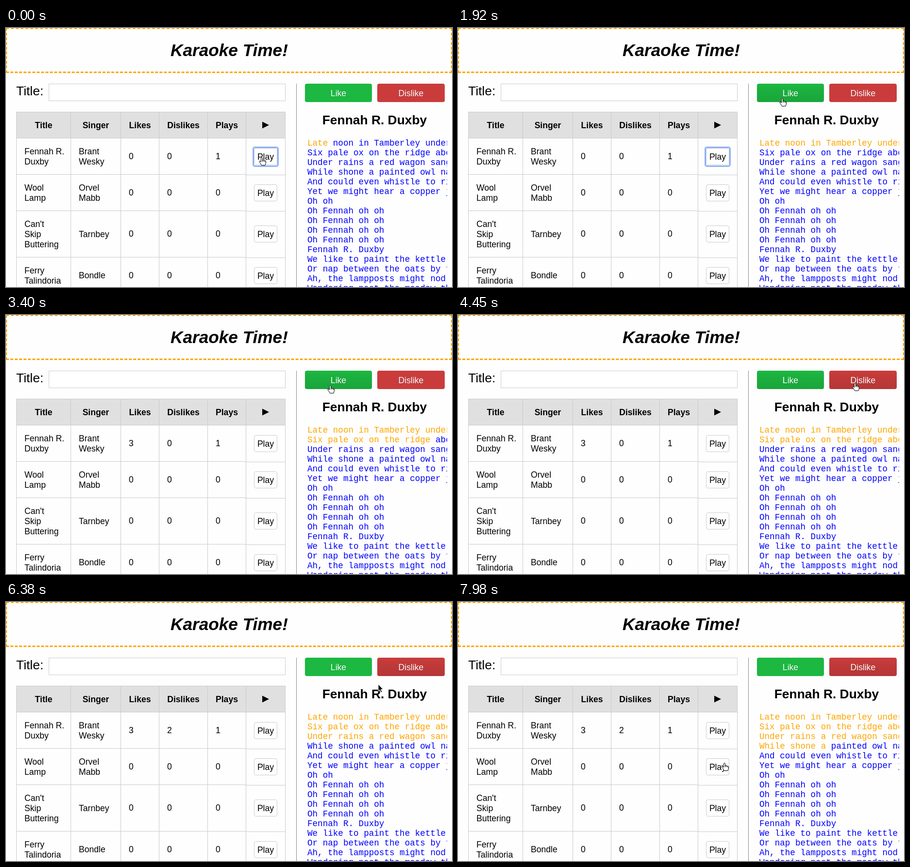
Recreate the animation shown at these times as an HTML page. Size 919 px wide and 535 px high, loop 8000 ms.

```html
<!DOCTYPE html>
<html lang="en">
<head>
<meta charset="utf-8">
<title>Karaoke Time!</title>
<style>
  html, body { margin: 0; width: 100%; height: 100%; overflow: hidden; background: #fefefe; }
  header {
    position: absolute; left: 0; top: 0; width: 919px; height: 93px; box-sizing: border-box;
    border: dashed orange; border-width: 2px 2px 3px;
  }
  svg { position: absolute; left: 0; top: 0; }
  text { font: 17.6px "Liberation Sans", Arial, sans-serif; white-space: pre; }
  .bold { font-weight: bold; }
  .big { font-size: 26.4px; }
  .mid { text-anchor: middle; }
  .logo { font: italic bold 35.2px "Liberation Sans", Arial, sans-serif; }
  .white { fill: #fff; text-shadow: 0 1px 1px rgba(0,0,0,.2); }
  .lyric { font-family: "Liberation Mono", "Courier New", monospace; fill: #00f; }
  .sung { fill: orange; }
</style>
</head>
<body>
<header></header>
<svg id="stage" width="919" height="535"></svg>
<script>
const TICK = 147.7, LOOP = 8000;
const song = ["Fennah R.", "Duxby"];
const rows = [
  { top: 227, mid: 265, title: song, singer: ["Brant", "Wesky"] },
  { top: 302, mid: 340, title: ["Wool", "Lamp"], singer: ["Orvel", "Mabb"] },
  { top: 377, mid: 425.5, title: ["Can't", "Skip", "Buttering"], singer: ["Tarnbey"] },
  { top: 473, mid: 511, title: ["Ferry", "Talindoria"], singer: ["Bondle"] }
];
const lyrics = [
  "Late noon in Tamberley under an old skyline",
  "Six pale ox on the ridge above the waterwheel",
  "Under rains a red wagon sang of dusty old days",
  "While shone a painted owl named after rain",
  "And could even whistle to rivers",
  "Yet we might hear a copper jug",
  "Oh oh",
  ...Array(4).fill("Oh Fennah oh oh"),
  song.join(" "),
  "We like to paint the kettle in blue",
  "Or nap between the oats by the gate",
  "Ah, the lampposts might nod him by",
  "Wandering past the meadow that hums"
];
// Cursor hotspot: tick, x, y
const path = [
  [0, 527, 267], [6, 527, 267], [13, 668, 145], [24, 668, 145], [27, 735, 264],
  [30, 818, 140], [41, 818, 140], [43, 767, 170], [45, 670, 235], [46, 705, 286],
  [48, 820, 230], [49, 820, 230], [54, 549, 332]
];

const text = (x, y, s, cls = "", id = "") => `<text x="${x}" y="${y}" class="${cls}" id="${id}">${s}</text>`;
const rect = (x, y, w, h, more) => `<rect x="${x}" y="${y}" width="${w}" height="${h}" ${more}/>`;
const lines = (x, mid, list) => list.map((s, i) => text(x, mid + 6.5 + (i - (list.length - 1) / 2) * 21, s)).join("");

function voteButton(id, x, w, color, label) {
  return rect(x, 115, w, 38, `rx="4" fill="${color}"`) +
    rect(x, 115, w, 38, `rx="4" fill="url(#shade)" id="${id}Lit"`) +
    `<g id="${id}Down" fill="none" stroke="#000">` +
    rect(x + .5, 115.5, w - 1, 37, 'rx="4" stroke-opacity=".25"') +
    rect(x + 1.5, 116.5, w - 3, 35, 'rx="3" stroke-opacity=".1"') + "</g>" +
    text(x + w / 2, 141, label, "mid white");
}

function table() {
  let out = rect(21, 173, 555, 54, 'fill="#e0e0e0"');
  let grid = "M21 173.5H576M21 227.5H576";
  for (const x of [21, 133, 236, 315, 415, 494, 575]) grid += `M${x}.5 173V535`;
  for (const { top } of rows.slice(1)) grid += `M21 ${top}.5H494M494 ${top + 1}.5H576`;
  out += `<path d="${grid}" stroke="#cbcbcb" fill="none"/>`;
  [["Title", 77.5], ["Singer", 185], ["Likes", 276], ["Dislikes", 365.5], ["Plays", 455]]
    .forEach(([s, x]) => out += text(x, 207, s, "bold mid"));
  out += '<path d="M528 193.5L542 200.5L528 207.5Z"/>';
  rows.forEach(({ mid, title, singer }, i) => {
    const y = Math.floor(mid) - 17;
    out += lines(38, mid - .5, title) + lines(150, mid - .5, singer);
    [["likes", 253], ["dislikes", 332], ["plays", 432]]
      .forEach(([id, x]) => out += text(x, Math.floor(mid) + 6, i || id != "plays" ? 0 : 1, "", id + i));
    out += rect(511.5, y + .5, 47, 34, 'rx="3.5" fill="#fff" stroke="#ccc"') + text(535, y + 24, "Play", "mid");
  });
  return out;
}

// Every word, and every line break, takes one beat
let beat = 0;
const lyricLine = (s, i) => {
  const spans = s.split(" ").map(w => `<tspan data-beat="${beat++}">${w}</tspan>`).join(" ");
  beat++;
  return text(0, 15 + i * 20, spans, "lyric");
};

stage.innerHTML = `
  <defs><linearGradient id="shade" x2="0" y2="1">
    <stop stop-opacity="0"/><stop offset=".4" stop-opacity=".05"/><stop offset="1" stop-opacity=".1"/>
  </linearGradient></defs>
  ${text(339, 58, "Karaoke Time!", "logo")}
  ${text(21, 139, "Title:", "big")}
  ${rect(88.5, 115.5, 487, 35, 'fill="#fff" stroke="#ccc"')}
  ${table()}
  ${rect(509.5, 246.5, 51, 39, 'rx="3.5" fill="none" stroke="#8fb2f7" stroke-width="3" id="ring"')}
  <path d="M598.5 115V535" stroke="#888"/>
  ${voteButton("like", 616, 138, "#1cb841", "Like")}
  ${voteButton("dislike", 765, 139, "#ca3c3c", "Dislike")}
  ${text(759.5, 199, song.join(" "), "bold big mid")}
  <svg x="621" y="228" width="288" height="307">${lyrics.map(lyricLine).join("")}</svg>
  <g id="cursor">
    <path id="arrow" d="M0 0V14.5L3.3 11.4L5.6 16.8L8 15.8L5.7 10.5H10Z" stroke="#fff"/>
    <path id="hand" fill="#fff" stroke="#000" stroke-linejoin="round"
      d="M-1.5 1.5Q0 -.5 1.5 1.5V6Q3 5 4 6.5Q5.5 5.6 6.5 7Q8.5 6.6 8.5 9V11Q8 14 7 16.5H-.5Q-2 13 -5 9.5Q-5.5 7 -3 8L-1.5 9.5ZM1.5 6V9M4 6.5V9M6.5 7V9.5"/>
  </g>`;

const $ = id => document.getElementById(id);
const show = (id, on) => $(id).setAttribute("visibility", on ? "visible" : "hidden");
const passed = (k, ticks) => ticks.filter(t => k >= t).length;
const words = [...document.querySelectorAll("tspan")];

function cursorAt(k) {
  const i = Math.max(1, path.findIndex(p => p[0] >= k));
  const [k0, x0, y0] = path[i - 1], [k1, x1, y1] = path[i];
  const u = (k - k0) / (k1 - k0), e = u * u * (3 - 2 * u);
  return [x0 + (x1 - x0) * e, y0 + (y1 - y0) * e];
}

function draw(t) {
  const k = Math.min(54, Math.floor(t / TICK));
  const [x, y] = cursorAt(k);
  const inside = (l, top, r, b) => x >= l && x <= r && y >= top && y <= b;
  const onLike = inside(616, 115, 754, 153), onDislike = inside(765, 115, 904, 153);
  const hand = onLike || onDislike || inside(511, 248, 559, 283) || inside(511, 323, 559, 358);

  words.forEach(w => w.classList.toggle("sung", Math.round(w.dataset.beat * 5 / 3) <= k));
  $("likes0").textContent = passed(k, [17, 20, 22]);
  $("dislikes0").textContent = passed(k, [34, 37]);
  show("ring", k < 16);
  show("likeLit", onLike || (k >= 16 && k < 33));
  show("dislikeLit", onDislike || k >= 33);
  show("likeDown", k == 16 || k == 19);
  show("dislikeDown", k == 33 || k == 36);
  $("cursor").setAttribute("transform", `translate(${Math.round(x)} ${Math.round(y)})`);
  show("hand", hand);
  show("arrow", !hand);
}

const start = performance.now();
function loop(now) {
  draw(Math.max(0, now - start) % LOOP);
  requestAnimationFrame(loop);
}
draw(0);
requestAnimationFrame(loop);
</script>
</body>
</html>
```
